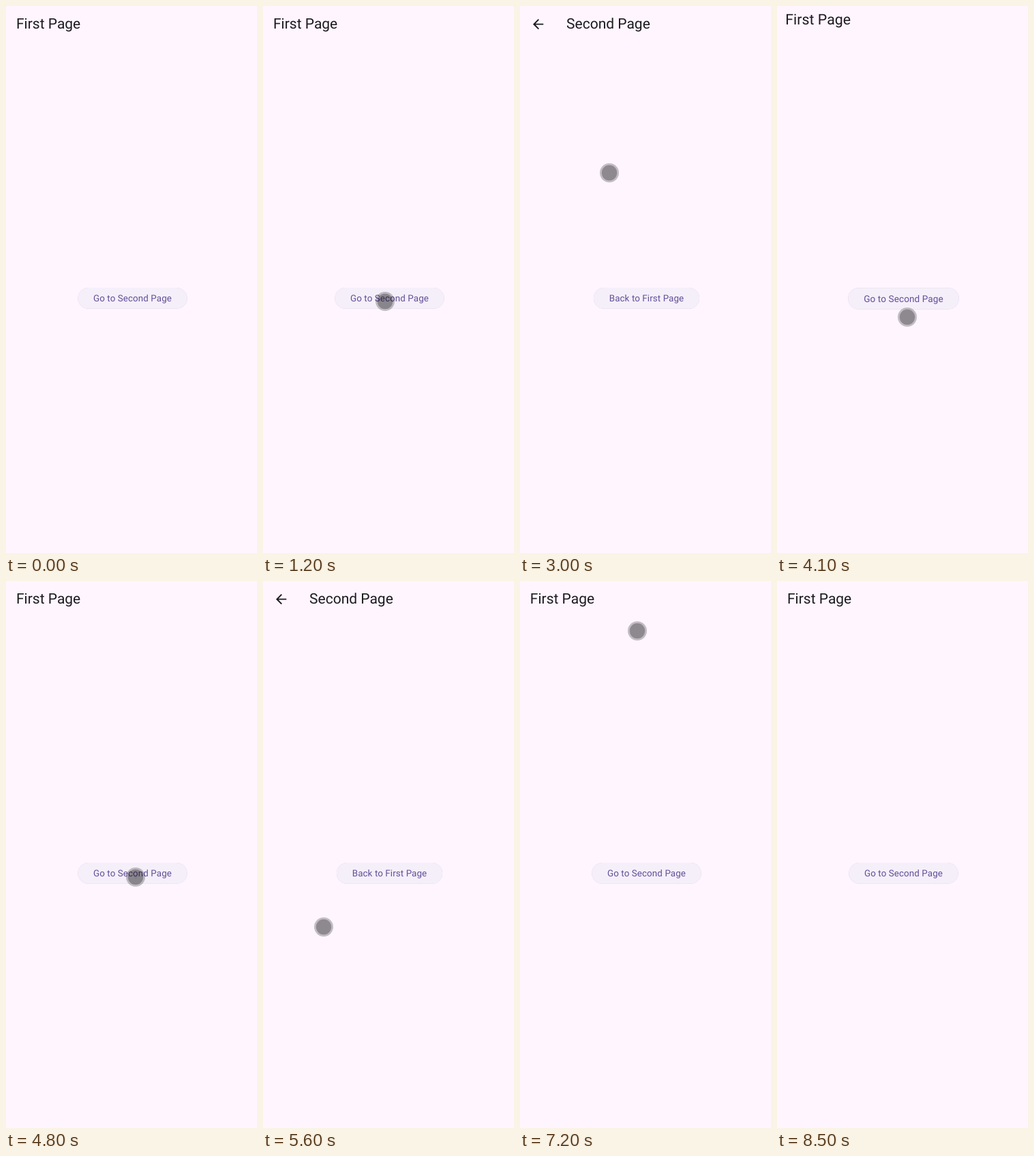
Recreate the animation shown at these times as an HTML page. Size 368 by 800 pixels, loop 8.9 s.

```html
<!DOCTYPE html>
<html lang="en">
<head>
<meta charset="utf-8">
<title>Page navigation</title>
<style>
  html, body { margin: 0; width: 100%; height: 100%; overflow: hidden; background: #fef5ff; }
  svg { display: block; width: 100%; height: 100%; }
  text { font-family: Roboto, sans-serif; text-rendering: geometricPrecision; }
  .bg { fill: #fef5ff; }
  .title { font-size: 21px; fill: #1d1b20; }
  .label { font-size: 13.37px; letter-spacing: .095px; text-anchor: middle; fill: #634f97; }
  .button { fill: #f5effa; filter: drop-shadow(0 .9px .5px rgba(40, 20, 70, .22)); }
  .ripple { fill: #6750a4; }
  .arrow { fill: #1d1b20; }
</style>
</head>
<body>
<svg viewBox="0 0 368 800">
  <defs>
    <clipPath id="pill"><rect x="105.4" y="412" width="160.2" height="30.8" rx="15.4"/></clipPath>
  </defs>
  <g id="first">
    <rect class="bg" width="371" height="801"/>
    <text class="title" x="15" y="33.3">First Page</text>
    <rect class="button" x="105.4" y="412" width="160.2" height="30.8" rx="15.4"/>
    <g clip-path="url(#pill)"><circle id="ripple" class="ripple"/></g>
    <text class="label" x="185.5" y="432">Go to Second Page</text>
  </g>
  <g id="second">
    <rect class="bg" width="371" height="801"/>
    <path class="arrow" transform="translate(15.2 15.2) scale(.955)"
      d="M20 11H7.83l5.59-5.59L12 4l-8 8 8 8 1.41-1.41L7.83 13H20z"/>
    <text class="title" x="68.1" y="33.3">Second Page</text>
    <rect class="button" x="107.9" y="412" width="155.2" height="30.8" rx="15.4"/>
    <text class="label" x="185.5" y="432">Back to First Page</text>
  </g>
  <g id="cursor">
    <circle r="14" opacity=".23"/>
    <circle r="11.2" opacity=".27"/>
  </g>
</svg>
<script>
const LOOP = 8900, STEP = 100;
const CENTER = { x: 185.5, y: 400 };
const MOVE = 300, PRESS = 400;

// Start of each page change: push, pop, push, pop
const moves = [1889, 3989, 5189, 6989];

// Pointer turning points: time, x, y
const path = [
  [400, 289, 407], [1200, 179, 432], [2300, 179, 432],
  [2600, 270, 573], [2750, 311, 440], [3000, 131, 244], [3600, 150, 480],
  [4000, 180, 436], [4100, 191, 455], [4400, 285, 520],
  [4800, 190, 433], [5200, 190, 433], [5600, 89, 506],
  [5800, 84, 572], [6400, 17, 35], [6800, 26, 26], [7000, 26, 26], [7400, 318, 120]
];

const byId = id => document.getElementById(id);
const [first, second, cursor, ripple] = ['first', 'second', 'cursor', 'ripple'].map(byId);
const clamp = v => Math.min(1, Math.max(0, v));

function setAttrs(el, attrs) {
  for (const name in attrs) el.setAttribute(name, attrs[name]);
}

function bezier(x, x1, y1, x2, y2) {
  const at = (u, a, b) => 3 * (1 - u) * (1 - u) * u * a + 3 * (1 - u) * u * u * b + u * u * u;
  let lo = 0, hi = 1;
  for (let i = 0; i < 24; i++) {
    const mid = (lo + hi) / 2;
    if (at(mid, x1, x2) < x) lo = mid; else hi = mid;
  }
  return at((lo + hi) / 2, y1, y2);
}

// Fast start, then a long settle
function emphasized(p) {
  const split = 1 / 6;
  return p < split
    ? .4 * bezier(p / split, .05, 0, .1333, .06)
    : .4 + .6 * bezier((p - split) / (1 - split), .2083, .82, .25, 1);
}

// Monotone curve through the path points, without overshoot
function pathValue(t, axis) {
  const last = path.length - 1;
  if (t >= path[last][0]) return path[last][axis];
  const i = Math.max(0, path.findIndex(p => p[0] > t) - 1);
  const rise = k => k < 0 || k >= last ? 0
    : (path[k + 1][axis] - path[k][axis]) / (path[k + 1][0] - path[k][0]);
  const slope = k => {
    const a = rise(k - 1), b = rise(k);
    return a * b > 0 ? 2 * a * b / (a + b) : 0;
  };
  const h = path[i + 1][0] - path[i][0], u = clamp((t - path[i][0]) / h), v = 1 - u;
  return path[i][axis] * (1 + 2 * u) * v * v + slope(i) * h * u * v * v
    + path[i + 1][axis] * (3 - 2 * u) * u * u - slope(i + 1) * h * u * u * v;
}

function setPage(el, scale, opacity) {
  const { x, y } = CENTER;
  setAttrs(el, {
    transform: `translate(${x} ${y}) scale(${scale}) translate(${-x} ${-y})`,
    opacity,
    display: opacity > 0 ? 'inline' : 'none'
  });
}

function drawPages(t) {
  const count = moves.filter(at => at <= t).length;
  const p = count ? clamp((t - moves[count - 1]) / MOVE) : 1;
  const e = emphasized(p);
  if (count % 2) {
    setPage(first, 1 + .05 * e, 1);
    setPage(second, .85 + .15 * e, clamp((p - .125) / .125));
  } else {
    setPage(first, 1.1 - .1 * e, 1);
    setPage(second, 1 - .1 * e, 1 - clamp((p - .0825) / .125));
  }
}

function drawPointer(t) {
  const x = pathValue(t, 1), y = pathValue(t, 2);
  const shown = t >= 400 && t < 7500;
  setAttrs(cursor, { transform: `translate(${x} ${y})`, display: shown ? 'inline' : 'none' });

  // The button is pressed shortly before each push
  const push = moves.find((at, i) => i % 2 === 0 && t >= at - PRESS && t < at + MOVE);
  const u = push ? (t - push + PRESS) / (PRESS + MOVE) : 0;
  setAttrs(ripple, { cx: x, cy: y, r: 150 * u, opacity: .1 * (1 - u) });
}

function draw(now) {
  const t = Math.floor(now % LOOP / STEP) * STEP;
  drawPages(t);
  drawPointer(t);
}

const start = performance.now();
function tick() {
  draw(performance.now() - start);
  requestAnimationFrame(tick);
}
tick();
</script>
</body>
</html>
```
